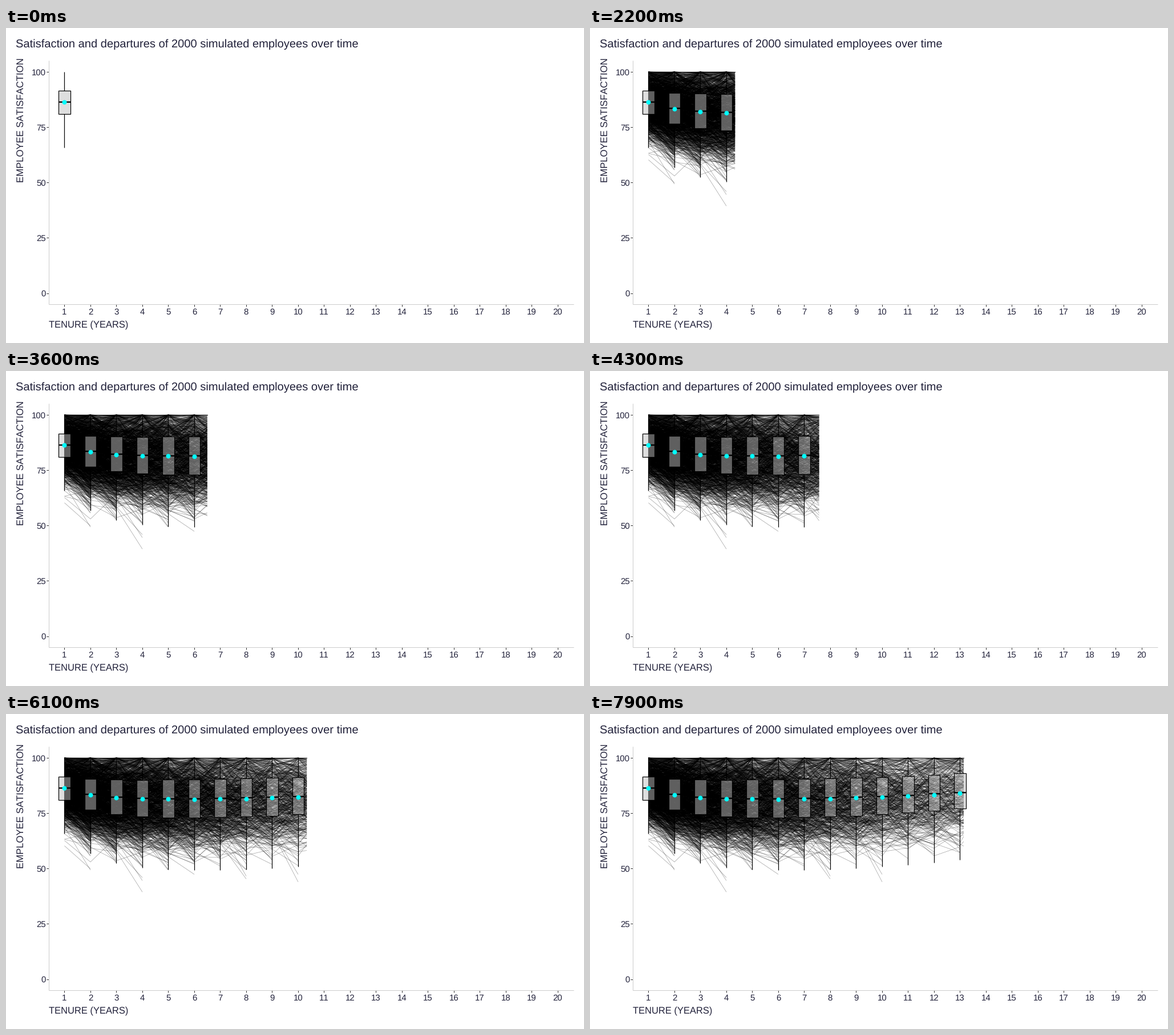
Write a matplotlib script that moves like this. It is 1013 by 553 pixels and loops after 8 s.

```python
import numpy as np
import matplotlib.pyplot as plt
from matplotlib.animation import FuncAnimation
from matplotlib.collections import LineCollection

W, H, DPI = 1013, 553, 64
PX = 72 / DPI                      # points per pixel
INK, TICK, AXIS = "#22223b", "#333333", "#cccccc"
FRAMES = 80
YEARS = 13
TOP = 77                           # height of a satisfaction of 100
STEP = 45.5                        # width of one year

plt.rcParams.update({
    "font.family": "Liberation Sans",
    "text.hinting": "none",
    "text.kerning_factor": 6,
})


def year_x(year):
    return 102.5 + STEP * (year - 1)


def value_y(value):
    return 465.5 - 3.885 * value


def trend(base, drop, rate, rise):
    """Satisfaction sinks quickly at first and recovers slowly later."""
    k = np.arange(YEARS + 1)
    return base - drop * np.exp(-rate * k) - rise * k ** 3


# Box statistics per year, as heights on the stage
Q3 = trend(115.8, 6.3, 1.5, 0.0068)
MED = trend(150, 20, 0.85, 0.0072)
Q1 = trend(184, 33.5, 0.75, 0.0105)
LOW = trend(277, 67, 0.75, 0.012)
MEAN = MED + 0.15 * np.arange(YEARS + 1)


def to_height(z, k):
    """Map standard scores to heights that fit the box of year index k."""
    y = np.interp(z, [-2.8, -0.674, 0, 0.674], [LOW[k], Q1[k], MED[k], Q3[k]])
    y += 60 * np.maximum(-2.8 - z, 0)
    slope = (MED[k] - Q3[k]) / 0.674
    return np.maximum(y - slope * np.maximum(z - 0.674, 0), TOP)


def simulate(count=2000, keep=0.8):
    """Start and end heights of every career, per year interval."""
    rng = np.random.default_rng(12)
    z = rng.standard_normal(count)
    spans = []
    for k in range(YEARS):
        nxt = keep * z + np.sqrt(1 - keep ** 2) * rng.standard_normal(z.size)
        nxt = (nxt - nxt.mean()) / nxt.std()
        spans.append((to_height(z, k), to_height(nxt, k + 1)))
        # The unhappy are the most likely to leave
        leave = 0.13 + 0.85 / (1 + np.exp(4 * (nxt + 2.1)))
        z = nxt[rng.random(z.size) > leave]
    return spans


def segments(k, part):
    """Lines of interval k, drawn up to the given part of the year."""
    a, b = spans[k]
    x = year_x(k + 1)
    seg = np.empty((a.size, 2, 2))
    seg[:, 0, 0], seg[:, 0, 1] = x, a
    seg[:, 1, 0], seg[:, 1, 1] = x + STEP * part, a + (b - a) * part
    return seg


def stroke(xs, ys, color, width, z=1):
    return ax.plot(xs, ys, color=color, lw=width * PX, zorder=z,
                   solid_capstyle="butt")[0]


def label(x, y, text, size, **kw):
    kw = {"ha": "left", "va": "baseline", **kw}
    ax.text(x, y, text, size=size * PX, color=INK, **kw)


def draw_axes():
    label(17.5, 33.7, "Satisfaction and departures of 2000 simulated employees over time", 20.17)
    label(75.5, 525.5, "TENURE (YEARS)", 16.5)
    label(32, 271.3, "EMPLOYEE SATISFACTION", 16.7, rotation=90, rotation_mode="anchor")
    for v in range(0, 101, 25):
        y = value_y(v)
        stroke([71.5, 75.5], [y, y], TICK, 1)
        label(70.2, y + 5.4, str(v), 15, ha="right")
    for year in range(1, 21):
        x = year_x(year)
        stroke([x, x], [485, 489], TICK, 1)
        label(x, 502.9, str(year), 15, ha="center")
    stroke([75.5, 75.5], [57, 485], AXIS, 1)
    stroke([75.5, 995], [484.8, 484.8], AXIS, 1)


def make_box(k):
    x = year_x(k + 1)
    left, right = x - 10.2, x + 10.2
    box = plt.Rectangle((left, Q3[k]), right - left, Q1[k] - Q3[k], zorder=4,
                        fc=(0.745, 0.745, 0.745, 0.5), ec="black", lw=1.2 * PX)
    ax.add_patch(box)
    dot = ax.scatter([x], [MEAN[k]], s=(8 * PX) ** 2, color="cyan", lw=0, zorder=6)
    return [
        box, dot,
        stroke([x, x], [TOP, Q3[k]], "black", 1.2, 3),
        stroke([x, x], [Q1[k], LOW[k]], "black", 1.2, 3),
        stroke([left, right], [MED[k], MED[k]], "black", 2.3, 5),
    ]


fig = plt.figure(figsize=(W / DPI, H / DPI), dpi=DPI, facecolor="white")
ax = fig.add_axes([0, 0, 1, 1])
ax.set_xlim(0, W)
ax.set_ylim(H, 0)
ax.axis("off")

spans = simulate()
draw_axes()
boxes = [make_box(k) for k in range(YEARS)]
webs = []
for k in range(YEARS):
    web = LineCollection([], colors=[(0, 0, 0, 0.36)], linewidths=0.72 * PX, zorder=2)
    ax.add_collection(web, autolim=False)
    webs.append(web)

# Each year takes six and a half frames, rounded up to whole ones
marks = [int(6.5 * k + 0.5) for k in range(YEARS + 1)]


def update(i):
    for k in range(YEARS):
        part = (i - marks[k]) / (marks[k + 1] - marks[k])
        webs[k].set_visible(part > 0)
        if 0 < part <= 1:
            webs[k].set_segments(segments(k, part))
        for artist in boxes[k]:
            artist.set_visible(part >= 0)
    return webs


def reset():
    for k in range(YEARS):
        webs[k].set_segments(segments(k, 1))
    return update(0)


anim = FuncAnimation(fig, update, frames=FRAMES, init_func=reset,
                     interval=100, repeat=True, repeat_delay=0, blit=False)
plt.show()
```
